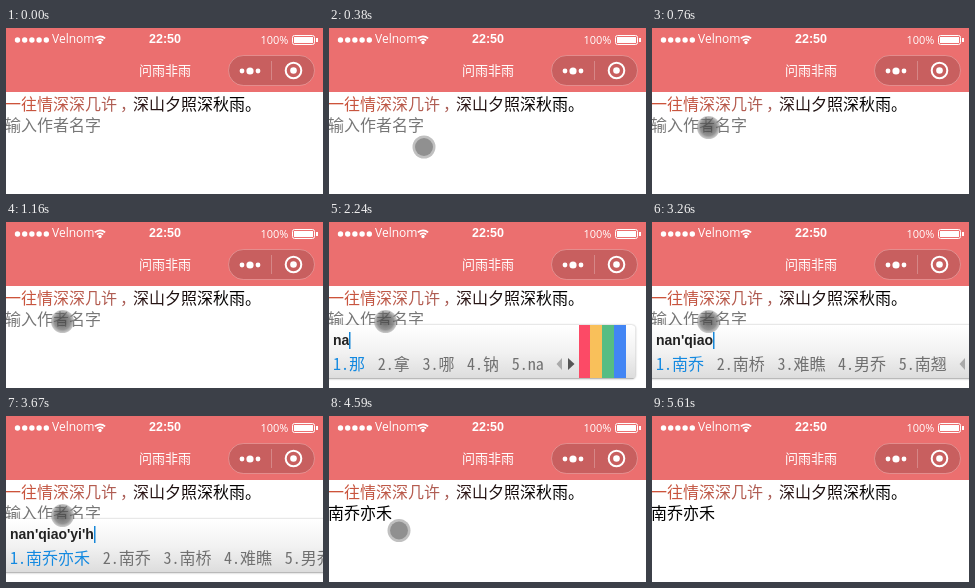
These frames come from a looping animation (317x166 px, 5840 ms). An HTML page with a canvas:

```html
<!DOCTYPE html>
<html lang="zh-CN">
<head>
<meta charset="utf-8">
<style>
  html, body { margin: 0; width: 100%; height: 100%; overflow: hidden; background: #fff; }
  canvas { display: block; }
</style>
</head>
<body>
<canvas id="stage" width="317" height="166"></canvas>
<script>
const W = 317, H = 166, LOOP = 5840;
const ctx = document.getElementById('stage').getContext('2d');
const CJK = '"Noto Sans CJK SC", "Noto Sans CJK", sans-serif';
const MONO = '"Noto Sans Mono CJK SC", "Noto Sans CJK SC", monospace';
const SANS = '"Liberation Sans", Arial, sans-serif';
const HUMAN = '"Open Sans", "Noto Sans", sans-serif';

const AUTHOR = '南乔亦禾';
const PANEL_IN = 2240, COMMIT = 4130;

// [start, pinyin, candidates]
const single = ['那', '拿', '哪', '钠', 'na'];
const pairs = ['南起', '难期', '南骑', '难弃', '南'];
const words = ['南乔', '南桥', '难瞧', '男乔', '南翘'];
const names = [AUTHOR, '南乔', '南桥', '难瞧', '男乔'];
const typing = [
  [PANEL_IN, 'na', single],
  [2640, 'nan', pairs],
  [2710, "nan'q", pairs],
  [2880, "nan'qi", pairs],
  [3110, "nan'qia", words],
  [3260, "nan'qiao", words],
  [3430, "nan'qiao'y", names],
  [3500, "nan'qiao'yi", names],
  [3670, "nan'qiao'yi'h", names]
];

// [start, x, y]
const pointer = [
  [150, 173, 160], [230, 150, 147], [300, 122, 132], [380, 95, 119],
  [460, 72, 109], [540, 55, 103], [610, 47, 102], [690, 52.5, 101.5],
  [760, 56.5, 99.5], [4590, 70, 114.5], [4670, 103, 150]
];

const latest = (steps, t) => steps.filter(s => s[0] <= t).pop();

function rect(x, y, w, h, color) {
  ctx.fillStyle = color;
  ctx.fillRect(x, y, w, h);
}

function disc(x, y, r, color) {
  ctx.fillStyle = color;
  ctx.beginPath();
  ctx.arc(x, y, r, 0, Math.PI * 2);
  ctx.fill();
}

function ring(x, y, r, width, color, from = 0, to = Math.PI * 2) {
  ctx.strokeStyle = color;
  ctx.lineWidth = width;
  ctx.beginPath();
  ctx.arc(x, y, r, from, to);
  ctx.stroke();
}

function pill(x, y, w, h, r) {
  ctx.beginPath();
  ctx.roundRect(x, y, w, h, r);
}

function text(str, x, y, font, color, align = 'left') {
  ctx.font = font;
  ctx.fillStyle = color;
  ctx.textAlign = align;
  ctx.fillText(str, x, y);
}

function fade(x0, y0, x1, y1, ...colors) {
  const g = ctx.createLinearGradient(x0, y0, x1, y1);
  colors.forEach((c, i) => g.addColorStop(i / (colors.length - 1), c));
  return g;
}

function triangle(x, y, dx, color) {
  ctx.fillStyle = color;
  ctx.beginPath();
  ctx.moveTo(x, y - 6);
  ctx.lineTo(x + dx, y);
  ctx.lineTo(x, y + 6);
  ctx.fill();
}

function drawHeader() {
  rect(0, 0, W, 64, '#eb6f6f');
  for (let i = 0; i < 5; i++) disc(11.5 + i * 7.2, 12, 2.7, '#fff');
  text('Velnom', 46, 15, '12px ' + HUMAN, '#fff');

  const up = -Math.PI / 2;
  for (const r of [4.2, 7.2]) ring(94, 15.5, r, 1.8, '#fff', up - 0.8, up + 0.8);
  disc(94, 14.5, 1.7, '#fff');

  text('22:50', 159, 15, 'bold 12.5px ' + SANS, '#fff', 'center');
  text('100%', 254.5, 16, '11px ' + HUMAN, '#fff');

  ctx.strokeStyle = '#fff';
  ctx.lineWidth = 1;
  pill(286.5, 7.5, 22, 9, 2);
  ctx.stroke();
  rect(288, 9, 19, 6, '#fff');
  rect(310, 10, 2, 4, '#fff');

  text('问雨非雨', 159, 47, '13px ' + CJK, '#fff', 'center');

  pill(222.5, 27.5, 86, 30, 15);
  ctx.fillStyle = 'rgba(0,0,0,.15)';
  ctx.fill();
  ctx.strokeStyle = 'rgba(255,255,255,.25)';
  ctx.stroke();
  rect(265, 33, 1, 19, 'rgba(255,255,255,.25)');
  disc(236, 43, 2.4, '#fff');
  disc(244, 43, 3.6, '#fff');
  disc(252, 43, 2.4, '#fff');
  ring(287.5, 42.5, 7.8, 2, '#fff');
  disc(287.5, 42.5, 3.3, '#fff');
}

function drawPage(t) {
  const font = '16px ' + CJK;
  const red = fade(0, 0, 128, 0, '#cf5238', '#a8605a');
  text('一往情深深几许', -1, 82, font, red);
  text('，', 114, 82, font, red);
  text('深山夕照深秋雨。', 127, 82, font, fade(127, 0, 220, 0, '#321a1a', '#000'));

  if (t >= 930 && t < 1160) rect(0, 86, W, 23, 'rgba(0,0,0,.04)');
  if (t < COMMIT) text('输入作者名字', -1, 103, font, '#777');
  else text(AUTHOR, -1, 103, font, '#000');

  const caret = (t >= COMMIT && t < 4590) || (t >= 5060 && t < 5610);
  if (caret) rect(63, 86, 1, 21, '#000');
}

function drawPointer(t) {
  const at = latest(pointer, t);
  if (!at || t >= 4740) return;
  const [start, x, y] = at;
  if (start === 760) {
    const g = ctx.createRadialGradient(x, y, 3, x, y, 11.5);
    g.addColorStop(0, 'rgba(70,70,70,.75)');
    g.addColorStop(0.6, 'rgba(95,95,95,.68)');
    g.addColorStop(0.8, 'rgba(125,125,125,.6)');
    g.addColorStop(1, 'rgba(150,150,150,.5)');
    disc(x, y, 11.5, g);
  } else {
    disc(x, y, 11.5, '#c0c0c0');
    disc(x, y, 9, '#909090');
  }
}

function drawPanel(t) {
  const step = latest(typing, t);
  if (!step || t >= COMMIT) return;
  const [, pinyin, list] = step;

  const spots = [];
  let end = 4;
  for (const word of list) {
    spots.push(end);
    end += 28.7 + (word === 'na' ? 16 : word.length * 16);
  }

  pill(-4, 103, end + 83, 54, 4);
  ctx.save();
  ctx.shadowColor = 'rgba(0,0,0,.35)';
  ctx.shadowBlur = 2;
  ctx.fillStyle = fade(0, 103, 0, 157, '#fff', '#f2f2f2', '#dcdcdc');
  ctx.fill();
  ctx.restore();
  rect(0, 156, end + 77, 1, '#b9b9b9');

  text(pinyin, 4, 123, 'bold 14px ' + SANS, '#222');
  rect(4 + Math.round(ctx.measureText(pinyin).width), 110, 1.5, 17, '#1787d8');

  list.forEach((word, i) => {
    text(`${i + 1}.${word}`, spots[i], 148, '16px ' + MONO, i ? '#707070' : '#1389e0');
  });

  triangle(end + 5.5, 142, -5.5, '#aaa');
  triangle(end + 11.5, 142, 6.5, '#555');
  ['#fc4a66', '#f9c05a', '#56bd83', '#4285f4'].forEach((color, i) => {
    rect(Math.round(end + 22 + i * 11.75), 103, 12, 53, color);
  });
}

function draw(t) {
  rect(0, 0, W, H, '#fff');
  drawHeader();
  drawPage(t);
  drawPanel(t);
  drawPointer(t);
}

const began = performance.now();
function tick() {
  draw((performance.now() - began) % LOOP);
  requestAnimationFrame(tick);
}
tick();
</script>
</body>
</html>
```
